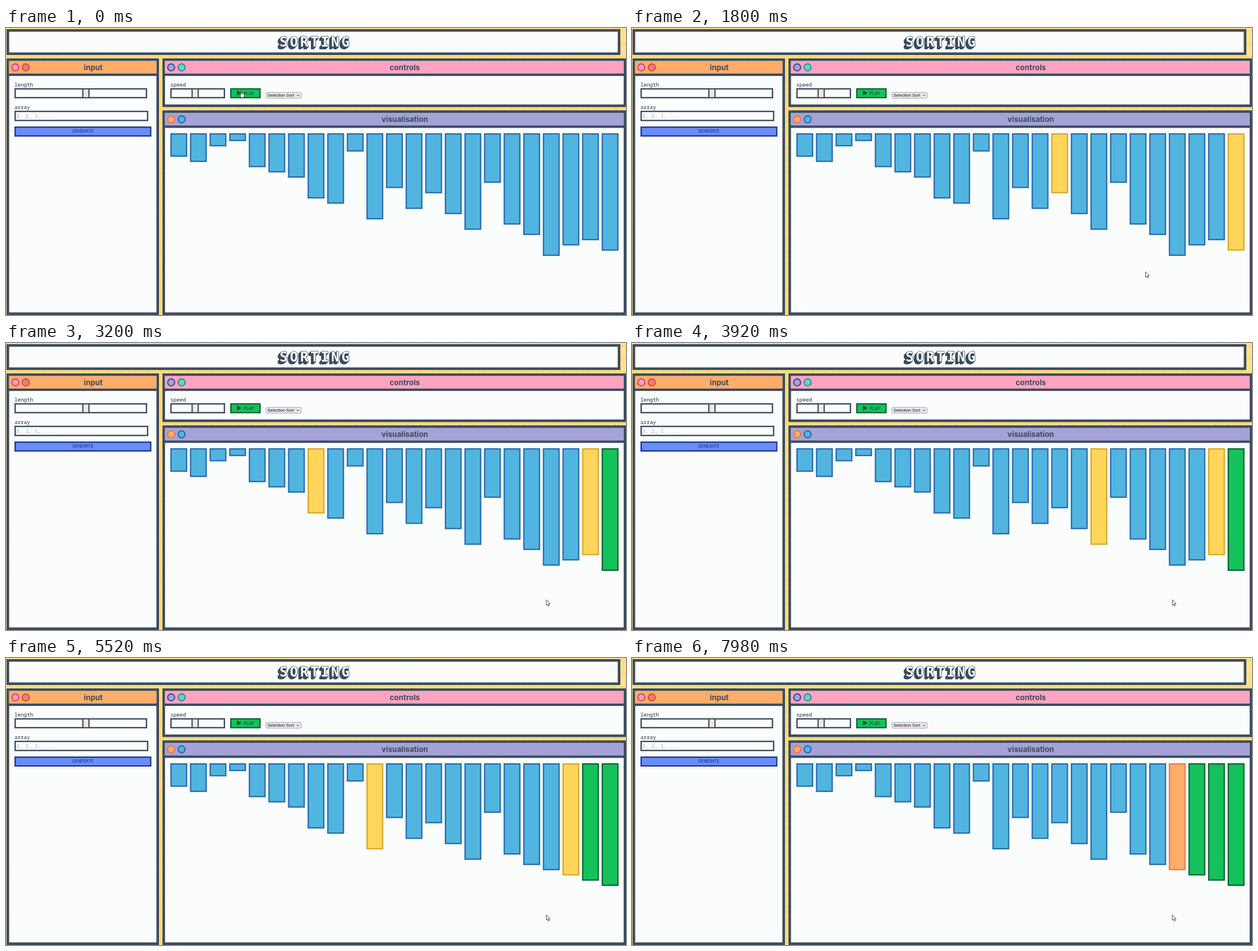
Animation of 1098 by 510 pixels, one loop 8000 ms. Source, as an HTML page with a canvas:

```html
<!DOCTYPE html>
<html lang="en">
<head>
<meta charset="utf-8">
<title>Sorting</title>
<style>
  html, body { margin: 0; width: 100%; height: 100%; overflow: hidden; background: #ffe28e; }
  canvas { display: block; width: 1098px; height: 510px; }
</style>
</head>
<body>
<canvas id="stage" width="1098" height="510"></canvas>
<script>
const ctx = document.getElementById('stage').getContext('2d');
const LOOP = 8000;
const DARK = '#3c4c5f', PAPER = '#fbfdfd';
const SANS = 'Inter, sans-serif', MONO = '"Noto Sans Mono", monospace';
const BAR = {
  idle: ['#51b5e0', '#2a6db3'],
  compare: ['#ffd55c', '#d9aa2c'],
  mark: ['#ffad69', '#f8745a'],
  done: ['#14c15b', '#0e6737']
};
const START = [4, 5, 2, 1, 6, 7, 8, 12, 13, 3, 16, 10, 14, 11, 15, 18, 9, 17, 19, 23, 21, 20, 22];

// Pace of the sort: [operation number, start in ms], linear in between.
const PACE = [[0, 605], [5, 1035], [8, 1355], [21, 2420], [38, 3890], [45, 4540],
  [55, 5505], [66, 6385], [70, 6785], [75, 7225], [85, 7975], [86, 8050]];
const COMPARE_SHARE = 0.58;

// Operations of a selection sort that moves the largest value to the end.
function sortOps(values, passes) {
  const ops = [], a = values.slice();
  for (let p = 0; p < passes; p++) {
    const end = a.length - 1 - p;
    let max = end;
    for (let j = 0; j < end; j++) {
      ops.push({ end, other: j, values: a.slice() });
      if (a[j] > a[max]) max = j;
    }
    const before = a.slice();
    [a[max], a[end]] = [a[end], a[max]];
    ops.push({ end, other: max, swap: true, values: before, after: a.slice() });
  }
  return ops;
}
const OPS = sortOps(START, 4);

function opAt(t) {
  for (let i = 1; i < PACE.length; i++) {
    const [n0, t0] = PACE[i - 1], [n1, t1] = PACE[i];
    if (t < t1) return n0 + (n1 - n0) * (t - t0) / (t1 - t0);
  }
  return OPS.length - 1;
}

function box(x0, y0, x1, y1, fill, edge, w = 2.4) {
  ctx.fillStyle = edge;
  ctx.fillRect(x0, y0, x1 - x0, y1 - y0);
  ctx.fillStyle = fill;
  ctx.fillRect(x0 + w, y0 + w, x1 - x0 - 2 * w, y1 - y0 - 2 * w);
}

function text(str, x, y, font, color = DARK, align = 'left') {
  ctx.font = font;
  ctx.fillStyle = color;
  ctx.textAlign = align;
  ctx.fillText(str, x, y);
}

function dot(x, y, fill, edge) {
  ctx.beginPath();
  ctx.arc(x, y, 6.2, 0, 2 * Math.PI);
  ctx.fillStyle = fill;
  ctx.fill();
  ctx.lineWidth = 2;
  ctx.strokeStyle = edge;
  ctx.stroke();
}

function polygon(points, fill, edge) {
  ctx.beginPath();
  points.forEach(([x, y]) => ctx.lineTo(x, y));
  ctx.closePath();
  ctx.fillStyle = fill;
  ctx.fill();
  if (edge) {
    ctx.lineWidth = 0.9;
    ctx.strokeStyle = edge;
    ctx.stroke();
  }
}

function backdrop() {
  ctx.fillStyle = '#ffe28e';
  ctx.fillRect(0, 0, 1098, 510);
  ctx.fillStyle = '#fbd264';
  for (let x = 20; x < 1098; x += 23) ctx.fillRect(x, 0, 1.5, 510);
  for (let y = 4; y < 510; y += 23) ctx.fillRect(0, y, 1098, 1.5);
}

function panel(x0, y0, x1, y1, title, color, dots) {
  box(x0, y0, x1, y1, PAPER, DARK, 4.6);
  ctx.fillStyle = DARK;
  ctx.fillRect(x0, y0 + 26, x1 - x0, 5.2);
  ctx.fillStyle = color;
  ctx.fillRect(x0 + 4.6, y0 + 4.8, x1 - x0 - 9.2, 22.2);
  dots.forEach(([fill, edge], i) => dot(x0 + 15.5 + 18.5 * i, y0 + 16, fill, edge));
  text(title, (x0 + x1) / 2 + 18.5, y0 + 21, `700 13.3px ${SANS}`, DARK, 'center');
}

function slider(x0, x1, thumb) {
  box(x0, 107, x1, 125, PAPER, DARK);
  box(thumb, 107, thumb + 13, 125, '#f1e9df', DARK, 2.2);
}

function heading() {
  box(1, 2, 1088, 48, PAPER, DARK, 4.6);
  ctx.letterSpacing = '3.8px';
  const font = '700 24px "DejaVu Sans Mono", monospace';
  ctx.lineJoin = 'round';
  ctx.lineWidth = 1.6;
  ctx.strokeStyle = DARK;
  for (let d = 4; d > 0; d -= 0.5) {
    text('SORTING', 484.5 - d, 33 + d, font);
    ctx.strokeText('SORTING', 484.5 - d, 33 + d);
  }
  ctx.strokeText('SORTING', 484.5, 33);
  text('SORTING', 484.5, 33, font, PAPER);
  ctx.letterSpacing = '0px';
}

function inputPanel() {
  panel(1, 54, 271, 510, 'input', '#ffad69', [['#ff9fbf', '#d93d66'], ['#f67d70', '#d4434b']]);
  const label = `9.2px ${MONO}`;
  text('length', 15, 104, label, '#222b36');
  slider(15, 250, 135);
  text('array', 15, 144, label, '#222b36');
  box(15, 147, 252, 165.5, PAPER, DARK);
  text('3, 2, 1, ...', 18, 159.5, label, '#aaa6cc');
  box(15, 175, 257.5, 193, '#698ef5', '#20369a');
  text('GENERATE', 136, 186.4, `500 7.2px ${SANS}`, '#20369a', 'center');
}

function controlsPanel() {
  panel(277, 54, 1098.5, 140.5, 'controls', '#ffa3c0', [['#a5a2d8', '#3a4496'], ['#65d3c7', '#2c8b8c']]);
  text('speed', 291, 104, `9.2px ${MONO}`, '#222b36');
  slider(291, 388, 328.5);
  box(397, 107, 451, 125, '#14c15b', '#0e6737');
  polygon([[409, 111], [417, 115.5], [409, 120]], '#0e5230');
  text('PLAY', 421, 118.7, `500 7.4px ${SANS}`, '#0e5230');
  ctx.beginPath();
  ctx.roundRect(460.4, 114.4, 62.4, 10.4, 2);
  ctx.fillStyle = '#e9e9ed';
  ctx.fill();
  ctx.lineWidth = 0.8;
  ctx.strokeStyle = '#8f8f9d';
  ctx.stroke();
  text('Selection Sort', 463, 122.3, '7.6px "Liberation Sans", Arial, sans-serif', '#111');
  ctx.beginPath();
  ctx.moveTo(514.8, 118.6);
  ctx.lineTo(517, 120.8);
  ctx.lineTo(519.2, 118.6);
  ctx.lineWidth = 1;
  ctx.strokeStyle = '#222';
  ctx.stroke();
}

function bars(t) {
  const n = opAt(t), started = n >= 0;
  const op = OPS[Math.max(0, Math.min(OPS.length - 1, Math.floor(n)))];
  const part = n - Math.floor(n);
  const values = op.swap && part > 0.5 ? op.after : op.values;
  const active = op.swap || part >= COMPARE_SHARE ? 'mark' : 'compare';
  values.forEach((v, i) => {
    let look = 'idle';
    if (started && i > op.end) look = 'done';
    else if (started && (i === op.end || i === op.other)) look = active;
    const x = 291 + 34.72 * i;
    box(x, 187, x + 30, 191.8 + 9.27 * v, ...BAR[look]);
  });
}

function arrow(x, y) {
  polygon([[0, 0], [0, 9.5], [2.2, 7.6], [3.7, 11], [5.2, 10.3], [3.7, 7], [6.6, 6.8]]
    .map(([dx, dy]) => [x + dx, y + dy]), '#fff', '#333');
}

function hand(x, y) {
  polygon([[2.2, 0.6], [3.6, 0.6], [3.8, 4.2], [5.4, 4.2], [7, 4.8], [8.6, 5.6], [8.6, 8.6],
    [7.6, 11.8], [3, 11.8], [0.2, 7.6], [0.8, 6.6], [2.2, 7.6]]
    .map(([dx, dy]) => [x + dx, y + dy]), '#fff', '#222');
}

function cursor(t) {
  const mix = (a, b, k) => a + (b - a) * k;
  const clamp = k => Math.max(0, Math.min(1, k));
  let x, y;
  if (t < 1100) {
    const k = clamp((t - 530) / 570);
    x = mix(413.5, 685.5, k);
    y = mix(112, 323.5, k);
  } else {
    const k = 1 - (1 - clamp((t - 1100) / 1020)) ** 1.5;
    x = mix(685.5, 957, k);
    y = mix(323.5, 456.5, k);
  }
  if (x < 451 && y < 125) hand(x, y);
  else arrow(x, y);
}

function draw(t) {
  backdrop();
  heading();
  inputPanel();
  controlsPanel();
  panel(277, 146.3, 1098.5, 510, 'visualisation', '#a5a2d8', [['#ffad69', '#f3704f'], ['#4fb5e0', '#2366a8']]);
  bars(t);
  cursor(t);
}

const begin = performance.now();
function tick() {
  draw((performance.now() - begin) % LOOP);
  requestAnimationFrame(tick);
}
tick();
</script>
</body>
</html>
```
